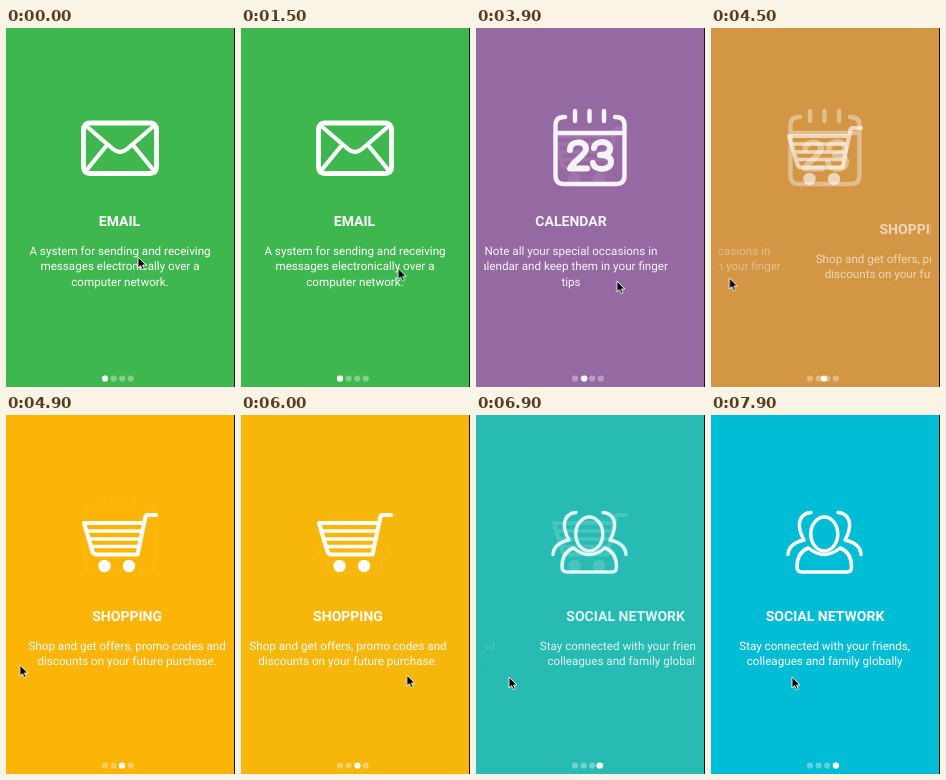
These frames come from a looping animation (229x359 px, 8000 ms). An HTML page:

```html
<!DOCTYPE html>
<html lang="en">
<head>
<meta charset="utf-8">
<title>Onboarding</title>
<style>
  /* --p is the pager position: 0 = first page, 3 = last page */
  @property --p { syntax: "<number>"; inherits: true; initial-value: 0; }

  html, body { margin: 0; width: 100%; height: 100%; overflow: hidden; }
  svg { display: block; width: 100%; height: 100%; }

  #pager { animation: swipe 8s linear infinite; }
  #cursor { animation: move 8s linear infinite; }

  @keyframes swipe {
    0%, 21.25% { --p: 0; }
    22.5% { --p: .02; }
    23.75% { --p: .12; }
    27.5%, 28.75% { --p: .66; }
    30% { --p: .71; animation-timing-function: ease-out; }
    35%, 47.5% { --p: 1; }
    48.75% { --p: 1.083; }
    56.25% { --p: 1.614; }
    57.5% { --p: 1.7; animation-timing-function: ease-out; }
    62.5%, 73.75% { --p: 2; }
    75% { --p: 2.033; }
    81.25% { --p: 2.455; }
    83.75% { --p: 2.637; animation-timing-function: ease-out; }
    90%, 100% { --p: 3; }
  }

  @keyframes move {
    0% { transform: translate(132px, 229px); animation-timing-function: ease-in-out; }
    11.25% { transform: translate(172px, 242px); animation-timing-function: ease-in-out; }
    21.25% { transform: translate(155px, 240px); }
    22.5% { transform: translate(150px, 240px); }
    23.75% { transform: translate(128px, 240px); }
    27.5%, 28.75% { transform: translate(4px, 243px); }
    30%, 33.75% { transform: translate(-12px, 246px); animation-timing-function: ease-in-out; }
    47.5% { transform: translate(160px, 253px); }
    48.75% { transform: translate(141px, 253px); }
    56.25% { transform: translate(18.5px, 250px); }
    57.5% { transform: translate(1px, 250px); }
    62.5% { transform: translate(18px, 250px); animation-timing-function: ease-in-out; }
    73.75% { transform: translate(174px, 260px); }
    75% { transform: translate(166px, 260px); }
    81.25% { transform: translate(72px, 261px); }
    83.75% { transform: translate(28px, 262px); animation-timing-function: ease-in-out; }
    95%, 97.5% { transform: translate(76px, 262px); }
    98.75%, 100% { transform: translate(81px, 262px); }
  }

  .n0 { --i: 0; } .n1 { --i: 1; } .n2 { --i: 2; } .n3 { --i: 3; }

  .bg { opacity: calc(var(--p) - var(--i) + 1); }
  .icon, .page { opacity: calc(1 - max(var(--p) - var(--i), var(--i) - var(--p))); }
  .page { transform: translateX(calc((var(--i) - var(--p)) * 230px)); }
  .icon { fill: none; stroke: #fff; stroke-linecap: round; stroke-linejoin: round; }
  .active { transform: translateX(calc(var(--p) * 8.6px)); }

  text { font: 400 11.65px Roboto, sans-serif; fill: #fff; text-anchor: middle; text-rendering: geometricPrecision; }
  .title { font-size: 14px; font-weight: 700; }
</style>
</head>
<body>
<svg id="pager" viewBox="0 0 229 359">
  <defs>
    <clipPath id="view"><rect x="8" y="160" width="212" height="120"/></clipPath>
  </defs>

  <rect class="bg n0" width="229" height="359" fill="#3fb74f"/>
  <rect class="bg n1" width="229" height="359" fill="#8b63b0"/>
  <rect class="bg n2" width="229" height="359" fill="#ffb602"/>
  <rect class="bg n3" width="229" height="359" fill="#00bcd4"/>

  <!-- envelope -->
  <g class="icon n0" stroke-width="4.8">
    <rect x="77.5" y="95" width="73" height="50.5" rx="6"/>
    <path stroke-width="4.2" d="M79 97 107 121Q114 127 121 121L149 97M79 144 101 117M149 144 127 117"/>
  </g>

  <!-- calendar -->
  <g class="icon n1" stroke-width="4.4">
    <path d="M89 89H88Q79.500 89 79.500 97.500V147.500Q79.500 156 88 156H140Q148.500 156 148.500 147.500V97.500Q148.500 89 140 89H139M79.500 105H148.500"/>
    <path d="M99 83V93M113.500 83V93M128 83V93"/>
    <path stroke-width="6" d="M94 122C94 112 110 112 110 121C110 127 97 133 94 140.500H111M118 120C119 112 134 112 134 120.500C134 126 129 127 124 127C130 127 135 129 135 134C135 143 118 143 117 135"/>
  </g>

  <!-- cart -->
  <g class="icon n2" stroke-width="4.2">
    <path d="M150 100H141.500Q139.800 100 139.400 102L131.500 139.500H91Q87 139.500 86 135L78 108H138"/>
    <path stroke-width="3.500" d="M81 116H136M83.500 124H134M86 131.500H132.500"/>
    <g fill="#fff" stroke="none">
      <circle cx="98.500" cy="151" r="6.200"/>
      <circle cx="123" cy="151" r="6.200"/>
    </g>
  </g>

  <!-- people -->
  <g class="icon n3" stroke-width="3.500">
    <ellipse cx="113.300" cy="119" rx="13.500" ry="17"/>
    <path d="M97.500 133Q113.300 146 129 133C136 135.500 140.500 141 140.500 152Q140.500 157 136 157H91Q86 157 86 152C86 141 90.500 135.500 97.500 133Z"/>
    <path d="M100 97.500C90 98 87 107 89 115C90 120 91.500 122 93 125C84 127 77.500 131 77 139.500"/>
    <path d="M127 97.500C137 98 140 107 138 115C137 120 135.500 122 134 125C143 127 149.500 131 150 139.500"/>
  </g>

  <g clip-path="url(#view)">
    <g class="page n0">
      <text class="title" x="113.500" y="198.200">EMAIL</text>
      <text x="114" y="227.200">A system for sending and receiving</text>
      <text x="114" y="242.400">messages electronically over a</text>
      <text x="114" y="257.600">computer network.</text>
    </g>
    <g class="page n1">
      <text class="title" x="114.300" y="198.200">CALENDAR</text>
      <text x="114.300" y="227.200">Note all your special occasions in</text>
      <text x="114.300" y="242.400">calendar and keep them in your finger</text>
      <text x="114.300" y="257.600">tips</text>
    </g>
    <g class="page n2">
      <text class="title" x="114.800" y="206">SHOPPING</text>
      <text x="114.800" y="235">Shop and get offers, promo codes and</text>
      <text x="114.800" y="250.200">discounts on your future purchase.</text>
    </g>
    <g class="page n3">
      <text class="title" x="114" y="206">SOCIAL NETWORK</text>
      <text x="113.700" y="235">Stay connected with your friends,</text>
      <text x="113.700" y="250.200">colleagues and family globally</text>
    </g>
  </g>

  <g fill="#fff">
    <g fill-opacity=".35">
      <circle cx="99" cy="350.500" r="3.100"/>
      <circle cx="107.600" cy="350.500" r="3.100"/>
      <circle cx="116.200" cy="350.500" r="3.100"/>
      <circle cx="124.800" cy="350.500" r="3.100"/>
    </g>
    <circle class="active" cx="99" cy="350.500" r="3.100"/>
  </g>

  <path id="cursor" d="M0 0V11L2.600 8.700 4.400 12.700 6.300 11.900 4.600 8H8Z" fill="#000" stroke="#fff" stroke-width=".9"/>
  <rect x="228" width="1" height="359" fill="#111"/>
</svg>
</body>
</html>
```
